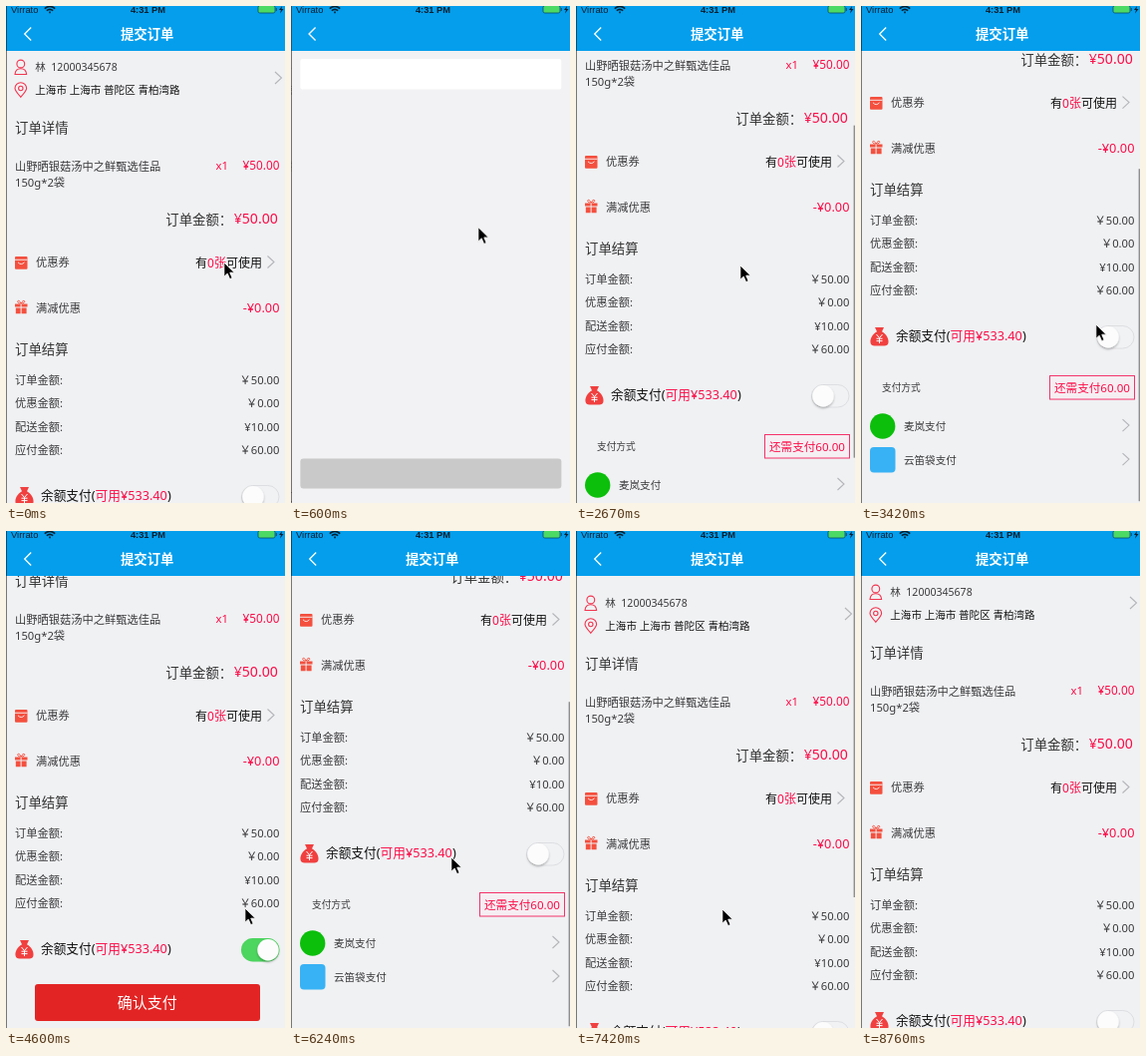
Write an HTML page that moves like this. It is 280 px wide and 498 px high and loops after 8910 ms.

```html
<!DOCTYPE html>
<html lang="zh-CN">
<head>
<meta charset="utf-8">
<title>提交订单</title>
<style>
@property --s { syntax: "<number>"; inherits: true; initial-value: 0; }
@property --p { syntax: "<number>"; inherits: true; initial-value: 0; }
@property --on { syntax: "<number>"; inherits: true; initial-value: 0; }
@property --bar { syntax: "<number>"; inherits: true; initial-value: 0; }

html, body { margin: 0; width: 100%; height: 100%; overflow: hidden; background: #f0f1f3; }
svg { display: block; width: 280px; height: 498px; overflow: hidden; }
text { font: 11.25px "Noto Sans", "Noto Sans CJK SC", "Noto Sans CJK", sans-serif; fill: #3a3a3c; white-space: pre; }
.head { font-size: 13.4px; fill: #333; }
.mid { font-size: 12px; fill: #111; }
.small { font-size: 10.55px; }
.end { text-anchor: end; }
.red { fill: #fb0d48; }
.title { font-size: 13.4px; font-weight: 700; fill: #fff; text-anchor: middle; }
.status { font: 9.4px "Liberation Sans", Arial, sans-serif; fill: #06202f; }
.line { fill: none; stroke: #f2354f; stroke-width: 1.1; }
.arrow { fill: none; stroke: #b4b5b9; stroke-width: 1.1; }
.back { fill: none; stroke: #fff; stroke-width: 1.3; }

/* The script moves --t; the keyframes hold every pose. */
#stage, #pay, #confirm, #cursor {
  animation: 8910ms linear infinite paused;
  animation-delay: calc(var(--t, 0) * -1ms);
}
#stage { animation-name: push, scroll, toggle, bar; }
#pay { animation-name: pay; }
#confirm { animation-name: confirm; }
#cursor { animation-name: move; }

#order { transform: translateX(calc(var(--p) * -81px)); }
#list { transform: translateY(calc(var(--s) * -1px)); }
#dim { opacity: calc(var(--p) * .1); }
#coupons { transform: translateX(calc((1 - var(--p)) * 288px)); }
#green { opacity: var(--on); }
#knob { transform: translateX(calc(var(--on) * 15px)); }
#thumb {
  y: calc(45px + min(max(var(--s), 0), 160) * .739px + max(var(--s) - 160, 0) * 1px);
  height: calc(333px - max(0, var(--s) * -1, var(--s) - 160) * 1px);
  opacity: var(--bar);
}

@keyframes push {
  0%, 1.3% { --p: 0; animation-timing-function: cubic-bezier(.3, .5, .3, 1); }
  7%, 16.6% { --p: 1; animation-timing-function: ease-in-out; }
  20% { --p: .247; animation-timing-function: ease-out; }
  23.5%, 100% { --p: 0; }
}
@keyframes scroll {
  0%, 26.6% { --s: 0; }
  28.3% { --s: 50; }
  30% { --s: 101; animation-timing-function: ease-out; }
  38.5%, 46.6% { --s: 160; animation-timing-function: ease-out; }
  51%, 61.6% { --s: 72; animation-timing-function: ease-out; }
  70% { --s: 168; }
  71.5% { --s: 160; }
  73.3% { --s: 142; }
  80% { --s: 8; animation-timing-function: ease-out; }
  83.33% { --s: -11; animation-timing-function: ease-in-out; }
  90%, 100% { --s: 0; }
}
@keyframes toggle {
  0%, 46% { --on: 0; }
  49%, 59.5% { --on: 1; }
  62.5%, 100% { --on: 0; }
}
@keyframes bar {
  0%, 26.6% { --bar: 0; }
  28%, 40% { --bar: 1; }
  43.3%, 61% { --bar: 0; }
  62.5%, 86% { --bar: 1; }
  90%, 100% { --bar: 0; }
}
@keyframes pay {
  0%, 46.5% { visibility: visible; animation-timing-function: step-end; }
  46.6% { visibility: hidden; animation-timing-function: step-end; }
  59.9%, 100% { visibility: visible; }
}
@keyframes confirm {
  0%, 46.5% { visibility: hidden; animation-timing-function: step-end; }
  46.6% { visibility: visible; animation-timing-function: step-end; }
  59.9%, 100% { visibility: hidden; }
}
@keyframes move {
  0%, 5% { transform: translate(218px, 256px); opacity: 1; }
  13.5% { transform: translate(60px, 76px); }
  15.5%, 17.8% { transform: translate(24px, 28px); }
  20% { transform: translate(34px, 46px); }
  25.5% { transform: translate(160px, 252px); }
  27%, 34% { transform: translate(164px, 259px); }
  39.5% { transform: translate(254px, 334px); }
  43.3%, 47% { transform: translate(247px, 332px); }
  51.67% { transform: translate(239px, 377px); }
  56.6%, 60.2% { transform: translate(252px, 416px); }
  65% { transform: translate(190px, 340px); }
  70%, 72% { transform: translate(160px, 326px); }
  78%, 93.2% { transform: translate(146px, 378px); }
  93.3%, 96.5% { transform: translate(146px, 365px); }
  96.6%, 98.1% { transform: translate(212px, 477px); opacity: 1; }
  98.2%, 100% { transform: translate(212px, 477px); opacity: 0; }
}
</style>
</head>
<body>
<svg id="stage" viewBox="0 0 280 498">
  <defs>
    <linearGradient id="edge">
      <stop offset="0" stop-color="#000" stop-opacity="0"/>
      <stop offset="1" stop-color="#000" stop-opacity=".07"/>
    </linearGradient>
    <filter id="soft" x="-40%" y="-40%" width="180%" height="200%">
      <feDropShadow dx="0" dy="1.5" stdDeviation="1.3" flood-opacity=".28"/>
    </filter>
    <path id="next" class="arrow" d="M0-6 6.5 0 0 6"/>
    <path id="prev" class="back" d="M25.2 21.5 18.7 28l6.5 6.5"/>
  </defs>

  <g id="order">
    <rect width="380" height="498" fill="#f0f1f3"/>
    <g id="list">
      <g class="line">
        <circle cx="14.8" cy="58" r="3.9"/>
        <path d="M9 68.5c.3-4 2.4-5.7 5.8-5.7s5.5 1.7 5.8 5.7z"/>
        <path d="M14.8 91.3C11 87 9 84.8 9 82.5a5.8 5.8 0 0 1 11.6 0c0 2.3-2 4.5-5.8 8.8z"/>
        <circle cx="14.8" cy="82.5" r="2.2"/>
      </g>
      <text class="small" x="29.3" y="65">林  12000345678</text>
      <text class="small" x="29.3" y="88" style="fill:#111">上海市 上海市 普陀区 青柏湾路</text>
      <use href="#next" x="270" y="72"/>

      <text class="head" x="9" y="127">订单详情</text>
      <text x="9" y="164.5">山野晒银菇汤中之鲜甄选佳品</text>
      <text x="9" y="180.5">150g*2袋</text>
      <text class="red" x="210.5" y="163.5">x1</text>
      <text class="red end" style="font-size:11.8px" x="274.5" y="163.7">¥50.00</text>
      <text class="head" x="160.3" y="219">订单金额：</text>
      <text class="red end" style="font-size:14.1px" x="272.8" y="217.5">¥50.00</text>

      <rect x="9" y="251" width="12.5" height="12.7" rx="1" fill="#f4503f"/>
      <path d="M9 254.3h12.500M12 256.800q3.250 3.600 6.500 0" fill="none" stroke="#f7e4e2"/>
      <path d="M9 298.5h5.6v3H9zm6.600 0h5.900v3h-5.900zM9.800 302.500h4.800v5.800H9.800zm5.800 0h5v5.800h-5z" fill="#f4503f"/>
      <path d="M15.2 298c-2.500.1-4-1-3.400-2.300.8-1 2.500.2 3.400 2.300.9-2.100 2.600-3.300 3.400-2.300.6 1.300-.9 2.400-3.400 2.300z" fill="none" stroke="#f4503f"/>
      <text x="30" y="261.2">优惠券</text>
      <text class="mid end" x="257" y="261.6">有<tspan class="red">0张</tspan>可使用</text>
      <use href="#next" x="262.5" y="256.5"/>
      <text x="30" y="306.7">满减优惠</text>
      <text class="red end" style="font-size:12.8px" x="274.5" y="307">-¥0.00</text>

      <text class="head" x="9" y="349">订单结算</text>
      <text x="9" y="378.5">订单金额:</text>
      <text x="9" y="402">优惠金额:</text>
      <text x="9" y="425.5">配送金额:</text>
      <text x="9" y="449">应付金额:</text>
      <text class="end" x="274.5" y="378.5">￥50.00</text>
      <text class="end" x="274.5" y="402">￥0.00</text>
      <text class="end" x="274.5" y="425.5">¥10.00</text>
      <text class="end" x="274.5" y="449">￥60.00</text>

      <path d="M14 482h9l-2 4.200c4.500 2.500 7 7 6.500 11-.3 2.400-1.800 3.300-4 3.300h-10c-2.200 0-3.700-.9-4-3.300-.5-4 2-8.500 6.500-11z" fill="#f0403f"/>
      <path d="M15.5 489l3 3.500 3-3.500M18.500 492.500v5.500M15.500 493.200h6M15.500 495.600h6" fill="none" stroke="#fff"/>
      <text class="mid" style="font-size:12.7px" x="35" y="495">余额支付(<tspan class="red">可用¥533.40</tspan>)</text>
      <rect x="236.5" y="480.5" width="37.5" height="22.5" rx="11.25" fill="#f1f2f4" stroke="#dddee1"/>
      <rect id="green" x="236" y="480" width="38.5" height="23.5" rx="11.75" fill="#4cd55f"/>
      <circle id="knob" cx="248" cy="491.7" r="10.7" fill="#fcfcfc" filter="url(#soft)"/>

      <g id="pay">
        <text style="font-size:9.7px" x="21" y="545.7">支付方式</text>
        <rect x="189.5" y="530.5" width="85" height="23.5" fill="#f5eef2" stroke="#f4336a"/>
        <text class="red end" style="font-size:11.6px" x="270" y="546.5">还需支付60.00</text>
        <circle cx="21.7" cy="581" r="12.7" fill="#0bbf0b"/>
        <text class="small" x="43" y="585">麦岚支付</text>
        <use href="#next" x="262.5" y="580"/>
        <rect x="9" y="602" width="25.5" height="25.5" rx="4" fill="#38b2f5"/>
        <text class="small" x="43" y="619">云笛袋支付</text>
        <use href="#next" x="262.5" y="614"/>
      </g>
      <g id="confirm">
        <rect x="29" y="526" width="226" height="37" rx="3" fill="#e32424"/>
        <text x="141.7" y="550" style="font-size:15px;fill:#fff;text-anchor:middle">确认支付</text>
      </g>
    </g>
    <rect id="thumb" x="278.6" width="1.4" fill="#8d8e91"/>
    <rect width="380" height="45" fill="#049eed"/>
    <use href="#prev"/>
    <text class="title" x="141.7" y="33">提交订单</text>
    <rect id="dim" y="45" width="380" height="453"/>
  </g>

  <g id="coupons">
    <rect x="-7" y="45" width="7" height="453" fill="url(#edge)"/>
    <rect width="280" height="498" fill="#f2f2f4"/>
    <rect width="280" height="45" fill="#049eed"/>
    <use href="#prev" x="-1"/>
    <rect x="9" y="53" width="262" height="30.5" rx="2" fill="#fff"/>
    <rect x="9" y="453.5" width="262" height="30" rx="3" fill="#c9c9ca"/>
  </g>

  <text class="status" x="5" y="6.8">Virrato</text>
  <g fill="none" stroke="#06202f" stroke-width="1.6">
    <path d="M38.800 2.600q5.200-4.400 10.400 0M40.800 4.700q3.200-2.600 6.400 0"/>
    <path d="M43.200 6.400h1.600"/>
  </g>
  <text class="status" style="font-weight:700;font-size:9.3px;text-anchor:middle" x="142.5" y="6.8">4:31 PM</text>
  <rect x="253" y="-.5" width="17" height="7.5" rx="1.8" fill="#4cd964" stroke="#0a4c6e" stroke-width=".8"/>
  <path d="M271.3 2v3" stroke="#0a4c6e"/>
  <path d="M277 0l-3 4h2l-1 3.500 3.500-4.500h-2z" fill="#06202f"/>
  <rect width="1" height="498" opacity=".5"/>

  <path id="cursor" d="M.8.8v14.600l3.400-3.200 2.400 5.500 2.600-1.200-2.400-5.300h4.700z" stroke="#fff" stroke-width="1"/>
</svg>
<script>
const LOOP = 8910, STEP = LOOP / 60;
const root = document.documentElement;
const start = performance.now();

// The picture advances in even steps of about 150 ms.
function draw() {
  const t = (performance.now() - start) % LOOP;
  const tick = Math.floor((t + 5) / STEP) % 60;
  root.style.setProperty("--t", tick * STEP);
  requestAnimationFrame(draw);
}
draw();
</script>
</body>
</html>
```
